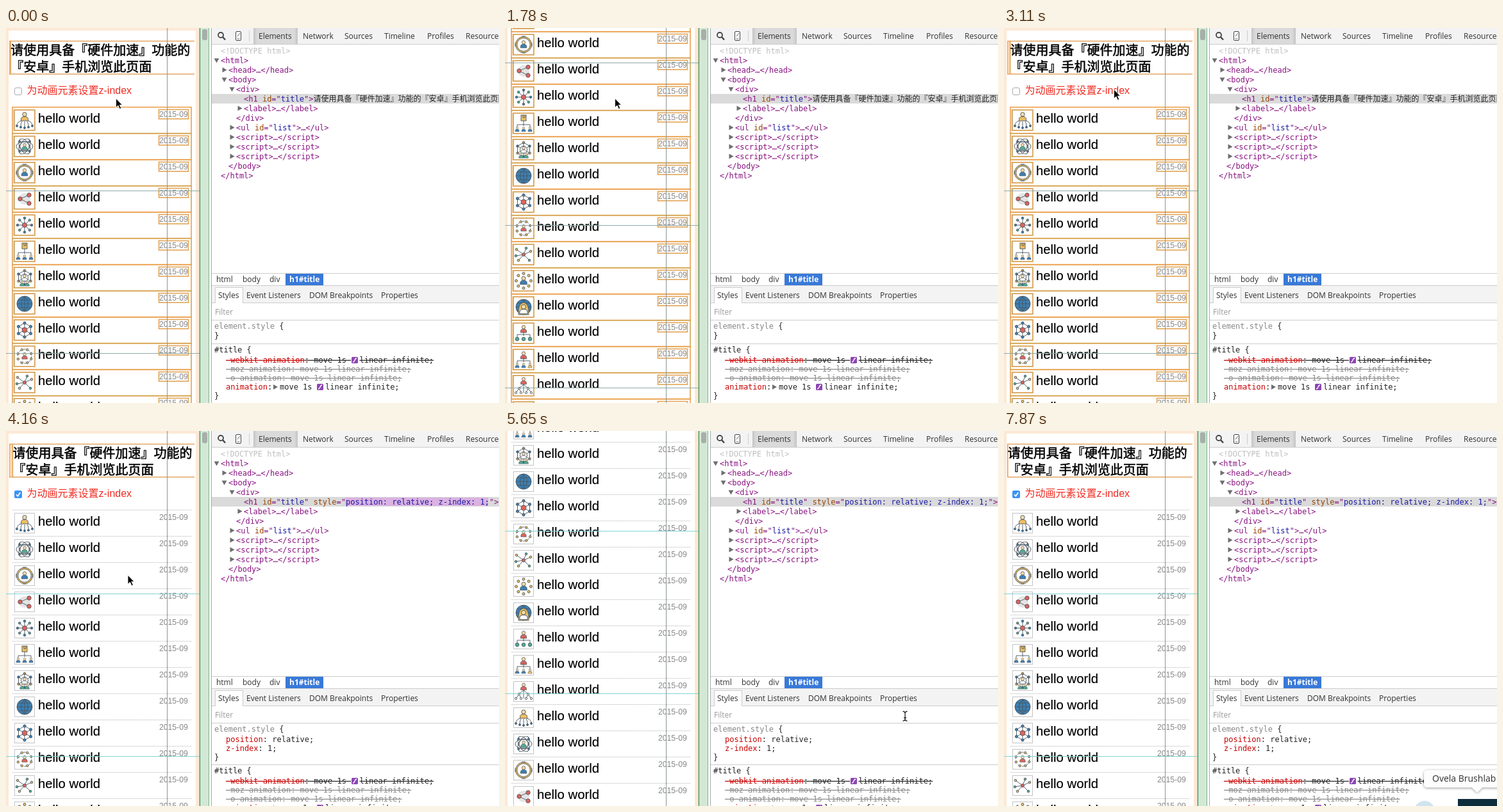
An HTML page for the animation above (7.9 s loop, 769x586 px).

```html
<!DOCTYPE html>
<html lang="zh-CN">
<head>
<meta charset="utf-8">
<title>Layer borders</title>
<style>
html, body { margin: 0; width: 100%; height: 100%; overflow: hidden; background: #fff; }
svg { display: block; }
text { white-space: pre; }
.ui { font: 12px "Open Sans", "Noto Sans", sans-serif; fill: #303030; }
.code { font: 12px "DejaVu Sans Mono", "Noto Sans CJK SC", monospace; fill: #222; }
.tag { fill: #881280; }
.name { fill: #994500; }
.value { fill: #1a1aa6; }
.prop { fill: #c80000; }
.dim { fill: #888; }
.strike { text-decoration: line-through; }
.title { font: 500 20px "Noto Sans CJK SC", "Noto Sans CJK", sans-serif; fill: #000; stroke: #000; stroke-width: .5; }
.label { font: 16px "Liberation Sans", "Noto Sans CJK SC", sans-serif; fill: #ee2c22; }
.hello { font: 20.3px "Liberation Sans", Arial, sans-serif; stroke: #000; stroke-width: .15; }
.date { font: 12.2px "Liberation Sans", Arial, sans-serif; fill: #888; }
.box { fill: none; stroke-width: 1.6; }
</style>
</head>
<body>
<svg id="stage" width="769" height="586" viewBox="0 0 769 586">
  <defs>
    <clipPath id="view"><path d="M0 0H302V586H0z"/></clipPath>
    <clipPath id="head"><path d="M5 19H294V73H5z"/></clipPath>
    <linearGradient id="tab">
      <stop offset="0" stop-color="#c4c4c4"/><stop offset=".08" stop-color="#dadada"/>
      <stop offset=".92" stop-color="#dadada"/><stop offset="1" stop-color="#c4c4c4"/>
    </linearGradient>
    <filter id="shade" x="-10%" y="-30%" width="120%" height="180%">
      <feDropShadow dx="0" dy="1" stdDeviation="2" flood-opacity=".4"/>
    </filter>
  </defs>
  <g clip-path="url(#view)"><g id="page"></g></g>
  <path d="M251.5 0V586" stroke="#8b9693"/>
  <g id="tools"></g>
  <g id="dock"></g>
  <path id="arrow" d="M0 0V14.2l3.4-3.1 2.5 5.5 2.4-1.1-2.5-5.2H10z" stroke="#fff" stroke-width=".9"/>
  <path id="beam" d="M-3.5-7.5q3 0 3.5 2.5q.5-2.5 3.5-2.5M0-5V5M-3.5 7.5q3 0 3.5-2.5q.5 2.5 3.5 2.5M-2 2.5h4" fill="none" stroke="#111" stroke-width="1.2"/>
</svg>
<script>
const $ = id => document.getElementById(id);
const esc = s => s.replace(/&/g, '&amp;').replace(/</g, '&lt;');
const text = (x, y, cls, s) => `<text x="${x}" y="${y}" class="${cls}">${s}</text>`;
const rect = (x, y, w, h, fill, more = '') =>
  `<rect x="${x}" y="${y}" width="${w}" height="${h}" fill="${fill}" ${more}/>`;
const path = (d, stroke, more = 'fill="none"') => `<path d="${d}" stroke="${stroke}" ${more}/>`;
const times = (n, f) => Array.from({ length: n }, (_, i) => f(i)).join('');

// ---- list icons, drawn around 0,0 in a 28px square
const Y = '#eebf62', B = '#3d7fb2', R = '#e0635a', G = '#4fae92', W = '#fff', INK = '#4a555e';
const dot = (x, y, r, c) => `<circle cx="${x}" cy="${y}" r="${r}" fill="${c}"/>`;
const shape = (d, c = 'none') => `<path d="${d}" fill="${c}"/>`;
const ring = (n, r, f, turn = -90) => times(n, i => {
  const a = (turn + i * 360 / n) * Math.PI / 180;
  return f(+(r * Math.cos(a)).toFixed(2), +(r * Math.sin(a)).toFixed(2), i);
});
const spoke = (x, y) => shape(`M0 0L${x} ${y}`);
const person = (x, y, s, c) => `<g transform="translate(${x} ${y}) scale(${s})">` +
  shape('M-5.5 7V4.5q0-4 5.5-4t5.5 4V7z', c) + dot(0, -3, 3.2, '#f6dca6') + '</g>';
const hub = (n, r, size, colors, turn) => ring(n, r, spoke, turn) +
  ring(n, r, (x, y, i) => dot(x, y, size, colors[i % colors.length]), turn);
const HEX = 'M0-11L9.5-5.5V5.5L0 11L-9.5 5.5V-5.5z';
const globe = dot(0, 0, 12, B) + shape('M-12 0H12M0-12V12M-10-6H10M-10 6H10M0-12Q-11 0 0 12Q11 0 0-12');
const tree = 'M0-3V4M-10 7V2H10V7';
const trio = f => [-10, 0, 10].map(f).join('');

const icons = [
  person(0, -6, 1, Y) + shape('M-5 1Q-11 2-12 8M-4 2Q-6 4-6 10M0 2V11M4 2Q6 4 6 10M5 1Q11 2 12 8') +
    [[-12, 9], [-6, 11], [0, 12], [6, 11], [12, 9]].map(p => dot(...p, 1.5, B)).join(''),
  [0, 60, 120].map(a => `<ellipse rx="13" ry="7.5" fill="none" transform="rotate(${a})"/>`).join('') +
    dot(0, 0, 7, W) + person(0, 0, .75, G) + ring(4, 11, (x, y) => dot(x, y, 1.5, B), 45),
  dot(0, 0, 12.5, Y) + dot(0, 0, 10.3, W) + person(0, -1, .85, B) + shape('M-13-3v6M13-3v6M-3-13h6M-3 13h6'),
  `<circle r="9" fill="#e4e4e4" stroke="none"/>` + shape('M7-6L-7 0L7 7') + dot(7, -6, 3.2, R) + dot(-7, 0, 3.2, R) + dot(7, 7, 3.2, R),
  hub(8, 11, 1.8, [B, G]) + dot(0, 0, 3.6, R),
  rect(-4, -13, 8, 9, Y) + shape('M-1-13v4h3v-4M0-4V4M-10 6V2H10V6') + trio(x => person(x, 9, .55, B)),
  hub(6, 11, 1.8, [Y, B]) + shape(HEX) + dot(0, 0, 5.5, W) + person(0, 0, .75, W) +
    person(-4, 9, .6, G) + person(4, 9, .6, G),
  globe,
  shape(HEX) + hub(6, 11, 2.1, [B]) + dot(0, 0, 4, R),
  '<circle r="11" fill="none" stroke-dasharray="4 3"/>' + ring(8, 11, (x, y) => dot(x, y, 1.7, Y), 22) + person(0, -1, .75, R),
  shape('M-11-8L0 0L4-10M0 0L11-5M0 0L9 9M0 0L-8 9M-12 2L0 0') +
    [[-11, -8], [4, -10], [11, -5], [9, 9], [-8, 9], [-12, 2]].map((p, i) => dot(...p, 1.8, i % 2 ? G : Y)).join('') + dot(0, 0, 2.5, R),
  ring(8, 11.5, (x, y) => dot(x, y, 2, Y)) + person(0, -1, .95, B),
  globe + shape('M-8 12Q-9-6 0-7Q9-6 8 12z', Y) + person(0, 3, 1.1, W),
  person(0, -7, .85, R) + shape(tree) + trio(x => dot(x, 9, 2.8, G)),
  person(0, -7, .85, R) + shape(tree) + person(-10, 9, .55, B) + person(0, 9, .55, B) + person(10, 9, .55, Y),
  person(0, -8, .8, R) + shape('M0-2L-7 4L-12 11M-7 4L-4 11M0-2V11M0-2L7 4L4 11M7 4L12 11') +
    [[-7, 4], [7, 4], [-12, 11], [-4, 11], [4, 11], [12, 11]].map(p => dot(...p, 1.6, W)).join('')
];

// ---- phone page
const ROWS = 24, TOP = 123, STEP = 41, TALL = TOP + ROWS * STEP;
const row = i => {
  const y = TOP + i * STEP;
  return rect(13.5, y + 5.5, 31, 31, '#fff', 'stroke="#c4c4c4"') +
    `<g transform="translate(29 ${y + 21})" stroke="${INK}" stroke-width=".9">${icons[i % 16]}</g>` +
    text(50, y + 25, 'hello', 'hello world') + text(239, y + 16, 'date', '2015-09');
};
const outline = i => {
  const y = TOP + i * STEP, hue = i % 2 ? '#d3a553' : '#ee9f4b';
  return rect(10, y + .7, 279, STEP, 'none', `class="box" stroke="${hue}"`) +
    rect(12.5, y + 5, 32.5, 32, 'none', 'class="box" stroke="#dba04e"') +
    rect(238.5, y + 4.5, 46, 14.5, 'none', 'class="box" stroke="#e2a456"');
};
$('page').innerHTML =
  rect(0, 0, 302, 4, '#fde8d5') + rect(0, 0, 4, TALL, '#fde8d5') + rect(296, 0, 6, TALL, '#fde8d5') +
  '<g clip-path="url(#head)">' +
    '<rect id="trail" x="5" y="20" height="52" fill="#fcdcb8"/>' +
    path('M294 20.5H5.5V72H294', '#e2a765', 'fill="none" stroke-width="1.4"') +
    '<g id="title">' + path('M5.2 20V72', '#dfa055', 'stroke-width="1.5"') +
    text(5.2, 42, 'title', '请使用具备『硬件加速』功能的') + text(5.2, 68, 'title', '『安卓』手机浏览此页面') + '</g></g>' +
  rect(13.5, 93.5, 11, 11, '#fff', 'rx="2.5" stroke="#aaa"') +
  `<g id="tick">${rect(13, 93, 12, 12, '#3b94f7', 'rx="2.5"')}${path('M16 99.2l2.3 2.6L22.3 96', '#fff', 'fill="none" stroke-width="1.7"')}</g>` +
  text(32.5, 103, 'label', '为动画元素设置z-index') +
  times(ROWS, row) +
  `<g id="plain">${times(ROWS, i => path(`M10 ${TOP + i * STEP + .5}H289`, '#b5b5b5', 'stroke-dasharray="1 1"'))}</g>` +
  `<g id="outlines">${times(ROWS, outline)}</g>` +
  `<g id="tiles">${times(4, i => path(`M0 ${254.5 + i * 254}H302`, 'inherit'))}</g>`;

// ---- inspector
const tri = (x, y, open) => `<path d="${open ? `M${x - 4} ${y - 3}h8l-4 7z` : `M${x - 3} ${y - 4}l7 4l-7 4z`}" fill="#6e6e6e"/>`;
const markup = s => esc(s).replace(/(\w+)="([^"]*)"/g,
  '<tspan class="name">$1</tspan>="<tspan class="value">$2</tspan>"');
const node = (i, depth, s, fold = '') => text(335 + depth * 12, 40 + i * 15, 'code tag', markup(s)) +
  (fold && tri(328.5 + depth * 12, 35.5 + i * 15, fold === 'v'));
const curve = (x, y) => rect(x, y, 10, 10, '#8d46b3', 'rx="1.5"') +
  path(`M${x + 2} ${y + 8}C${x + 6} ${y + 8} ${x + 4} ${y + 2} ${x + 8} ${y + 2}`, '#fff', 'fill="none" stroke-width="1.3"');
const prop = (x, y, name, rest) => text(x, y, 'code', `<tspan class="prop">${name}</tspan>${rest}`);
const words = (y, list) => list.map(([x, s]) => text(x, y, 'ui', s)).join('');
const rule = (y, x = 321) => path(`M${x} ${y}H769`, '#ccc');

$('tools').innerHTML =
  rect(302, 0, 18, 586, '#fff') + rect(304, 0, 12, 586, '#d2e8d5') +
  path('M302.5 0V586', '#3f8f55', 'stroke-width="1.5"') + path('M316.5 0V586', '#79b487') +
  rect(306, 2, 8, 17, '#a9aeaa', 'rx="3"') +
  rect(320, 0, 449, 586, '#fff') + rect(320, 0, 449, 25, '#f3f3f3') + rule(25.5) +
  path('M320.5 0V586', '#aaa') +
  `<circle cx="335" cy="11" r="4" fill="none" stroke="#444" stroke-width="1.8"/>` + path('M338 14l4 4.5', '#444', 'stroke-width="2.4"') +
  rect(358.5, 5.5, 8, 14, '#fff', 'rx="1.5" stroke="#444"') + path('M360.5 17h4M361 13l4-5', '#666') +
  path('M379.5 4V21', '#ccc') + rect(386, 0, 69, 25, 'url(#tab)') +
  words(17, [[394, 'Elements'], [463, 'Network'], [528, 'Sources'], [590, 'Timeline'], [657, 'Profiles'], [717, 'Resources']]) +
  rect(321, 103, 448, 15, '#dadada') +
  '<rect id="flash" x="529" y="104" width="223" height="13" fill="#dc9fe6"/>' +
  text(335, 40, 'code', '<tspan fill="#c0c0c0">&lt;!DOCTYPE html></tspan>') +
  node(1, 0, '<html>', 'v') + node(2, 1, '<head>…</head>', '>') + node(3, 1, '<body>', 'v') + node(4, 2, '<div>', 'v') +
  `<g id="before">${node(5, 3, '<h1 id="title">')}${text(479.5, 115, 'code', '请使用具备『硬件加速』功能的『安卓』手机浏览此页面')}</g>` +
  `<g id="after">${node(5, 3, '<h1 id="title" style="position: relative; z-index: 1;">')}</g>` +
  node(6, 3, '<label>…</label>', '>') + node(7, 2, '</div>') + node(8, 2, '<ul id="list">…</ul>', '>') +
  [9, 10, 11].map(i => node(i, 2, '<script>…<\/script>', '>')).join('') +
  node(12, 1, '</body>') + node(13, 0, '</html>') +
  rule(383.5) + rect(436, 384, 59, 18, '#3879d9') +
  words(397, [[328, 'html'], [369, 'body'], [411, 'div']]) +
  text(442, 397, 'ui', '<tspan fill="#fff" font-weight="700">h1#title</tspan>') +
  rect(321, 403, 448, 27, '#f3f3f3') + rule(402.5) + rule(429.5) +
  path('M326.5 430V405.5H369.5V430', '#ccc', 'fill="#fff"') +
  words(422, [[331, 'Styles'], [375, 'Event Listeners'], [473, 'DOM Breakpoints'], [585, 'Properties']]) +
  text(326, 448, 'ui', '<tspan fill="#999">Filter</tspan>') + rule(456.5) +
  text(325, 470, 'code', '<tspan class="dim">element.style</tspan> {') +
  `<g id="inline">${prop(343, 486, 'position', ': relative;')}${prop(343, 500, 'z-index', ': 1;')}</g>` +
  text(325, 485, 'code brace', '}') +
  '<g id="rules">' + rule(493.5) + text(325, 507, 'code', '#title {') +
  prop(343, 523, '<tspan class="strike">-webkit-animation</tspan>', '<tspan class="strike">: move 1s </tspan>') +
  curve(539, 514) + text(551.5, 523, 'code strike', 'linear infinite;') +
  ['-moz', '-o'].map((p, i) => text(343, 537 + i * 14, 'code dim strike', p + '-animation: move 1s linear infinite;')).join('') +
  prop(343, 565, 'animation', ':') + tri(420, 561) + text(427, 565, 'code', 'move 1s ') + curve(485, 556) +
  text(498, 565, 'code', 'linear infinite;') + text(325, 579, 'code', '}') + '</g>';
const brace = document.querySelector('.brace');

$('dock').innerHTML =
  '<g id="apps"><circle cx="656" cy="594" r="16" fill="#cfe4ef"/>' + rect(708, 575, 62, 62, '#0d2c3c') + '</g>' +
  '<path d="M661 530H790V557H746l-8 8l-8-8H661q-6 0-6-6V536q0-6 6-6z" fill="#fdfdfd" filter="url(#shade)"/>' +
  '<text x="668" y="548" class="ui" style="font-size:14px">Ovela Brushlab</text>';

// ---- motion
const LOOP = 7900, TICK = 148.2, CLICK = 4000;
const scrollKeys = [[1190, 0], [1480, 110], [1780, 200], [1930, 180], [2230, 16], [2380, 0],
  [4600, 0], [5350, 352], [6240, 352], [7000, 0]];
const mouseKeys = [[2380, 171.5, 110], [3110, 171.5, 96], [3860, 171.5, 96], [4160, 190, 225], [4450, 195, 290],
  [5300, 195, 290], [5650, 628, 447], [5940, 635, 449], [6100, 635, 449], [6500, 210, 300], [6950, 210, 300],
  [7270, 735, 565], [7410, 745, 600]];
const at = (keys, t, k = 1) => {
  const i = keys.findIndex(p => p[0] > t);
  if (i === 0) return keys[0][k];
  if (i < 0) return keys[keys.length - 1][k];
  const a = keys[i - 1], b = keys[i];
  return a[k] + (b[k] - a[k]) * (t - a[0]) / (b[0] - a[0]);
};
const move = (el, x, y) => el.setAttribute('transform', `translate(${x.toFixed(2)} ${y.toFixed(2)})`);
const show = (el, on) => { el.style.display = on ? '' : 'none'; };

function draw(now) {
  const t = Math.floor((now % LOOP) / TICK + .02) * 148.6;
  const on = t >= CLICK, phase = (t + 100) % 1000 / 500;
  const shift = 10 * (phase < 1 ? phase : 2 - phase);
  move($('title'), shift, 0);
  $('trail').setAttribute('width', shift);
  move($('page'), 0, -Math.round(at(scrollKeys, t)));

  for (const id of ['tick', 'plain', 'after', 'inline']) show($(id), on);
  for (const id of ['outlines', 'before']) show($(id), !on);
  $('tiles').setAttribute('stroke', on ? '#84d3d3' : '#8fa9a8');
  $('flash').setAttribute('opacity', on ? Math.max(0, .75 * (1 - (t - CLICK) / 1300)) : 0);
  move($('rules'), 0, on ? 28 : 0);
  brace.setAttribute('y', on ? 514 : 485);

  const x = at(mouseKeys, t), y = at(mouseKeys, t, 2), inText = x > 320 && y > 403 && t < 6900;
  show($('arrow'), !inText);
  show($('beam'), inText);
  move($('arrow'), x, y);
  move($('beam'), x, y);

  show($('dock'), t > 7700);
  move($('apps'), 0, t > 7800 ? 0 : 5);
}
const start = performance.now();
(function frame() {
  draw(performance.now() - start);
  requestAnimationFrame(frame);
})();
</script>
</body>
</html>
```
